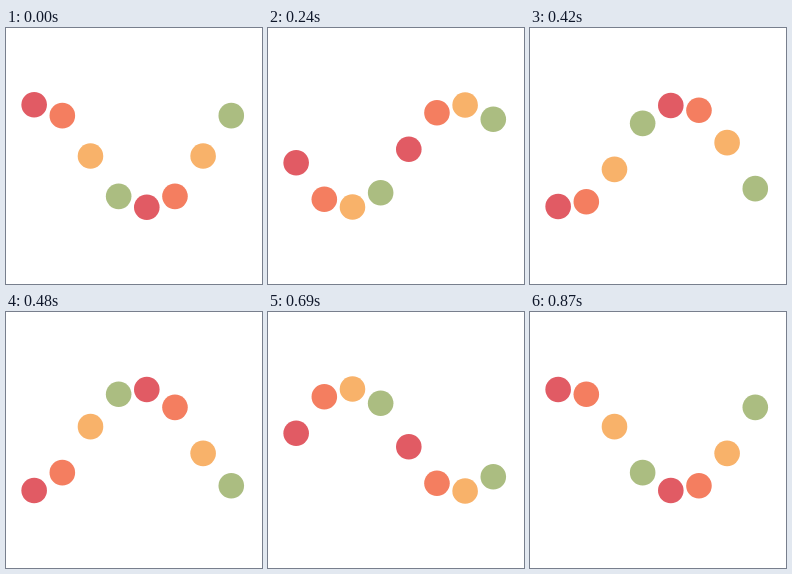
Write an HTML page that moves like this. It is 256x256 px and loops after 900 ms.

```html
<!DOCTYPE html>
<html lang="en">
<head>
<meta charset="utf-8">
<title>Wave of balls</title>
<style>
  html, body { margin: 0; width: 100%; height: 100%; overflow: hidden; background: #fff; }
  svg { display: block; width: 100vw; height: 100vh; }
</style>
</head>
<body>
<svg id="stage" viewBox="0 0 100 100"></svg>
<script>
  const LOOP = 900, STEP = 30, COUNT = 8;
  const TOP = 30, BOTTOM = 70;
  const COLORS = ['#e15b64', '#f47e60', '#f8b26a', '#abbd81'];
  const stage = document.getElementById('stage');

  const balls = Array.from({ length: COUNT }, (_, i) => {
    const ball = document.createElementNS(stage.namespaceURI, 'circle');
    ball.setAttribute('cx', 11 * (i + 1));
    ball.setAttribute('r', 5);
    ball.setAttribute('fill', COLORS[i % COLORS.length]);
    return stage.appendChild(ball);
  });

  // cubic-bezier(.5, 0, .5, 1), solved by bisection
  function ease(x) {
    let lo = 0, hi = 1;
    for (let n = 0; n < 24; n++) {
      const s = (lo + hi) / 2;
      if (1.5 * s * (1 - s) + s ** 3 < x) lo = s; else hi = s;
    }
    return lo * lo * (3 - 2 * lo);
  }

  function draw(time) {
    const t = Math.floor((time + 0.5) / STEP) * STEP;
    balls.forEach((ball, i) => {
      const phase = (t / LOOP + i / COUNT) % 1;
      const p = phase < 0.5 ? phase * 2 : 2 - phase * 2;
      ball.setAttribute('cy', (TOP + (BOTTOM - TOP) * ease(p)).toFixed(3));
    });
  }

  function tick(now) {
    draw(now);
    requestAnimationFrame(tick);
  }

  draw(0);
  requestAnimationFrame(tick);
</script>
</body>
</html>
```
